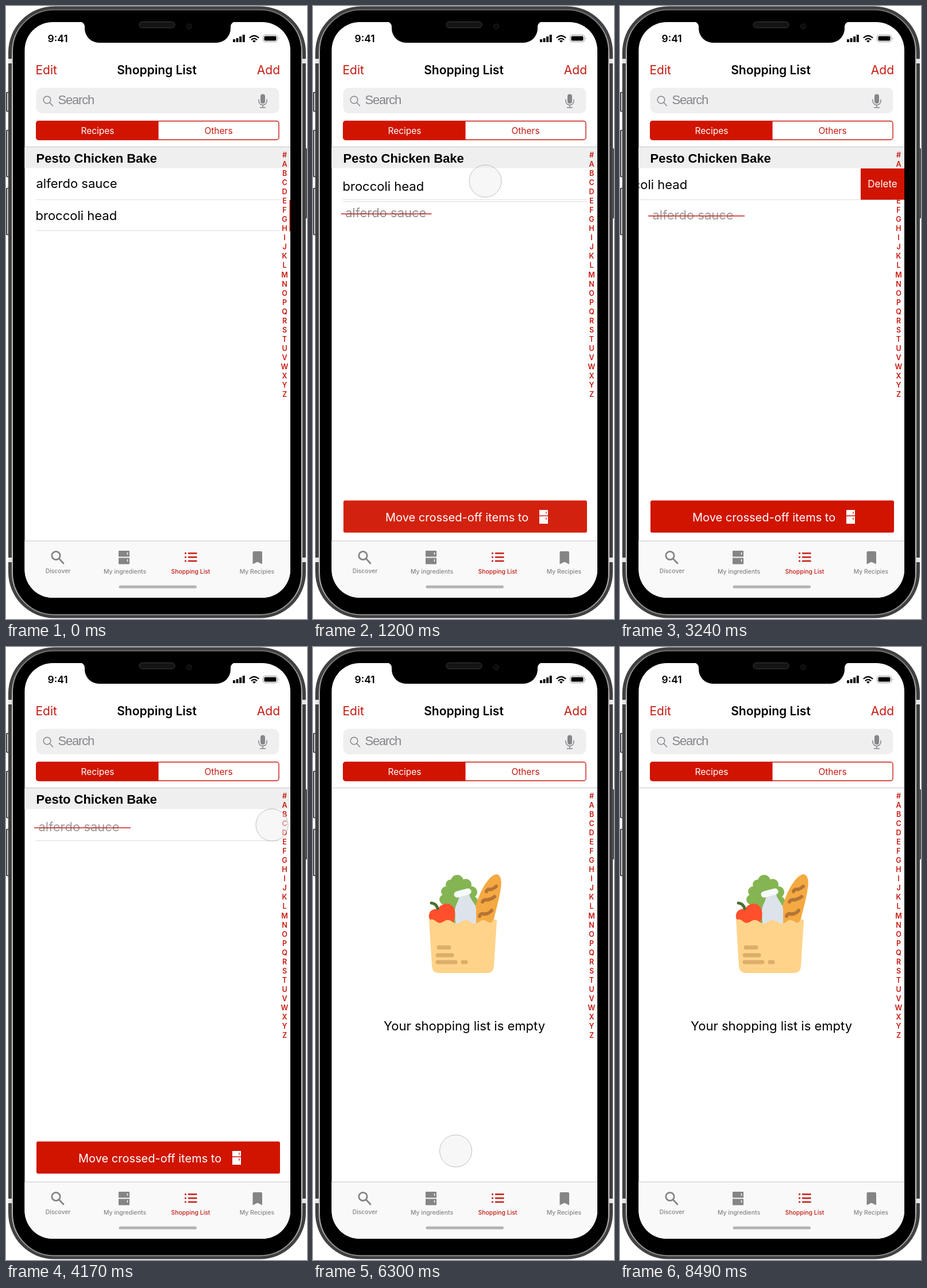
Recreate the animation shown at these times as an HTML page. Size 524 px wide and 1068 px high, loop 8520 ms.

```html
<!DOCTYPE html>
<html lang="en">
<head>
<meta charset="utf-8">
<title>Shopping List</title>
<style>
  html, body { margin: 0; width: 100%; height: 100%; overflow: hidden; background: #fff; }
  svg { display: block; width: 524px; height: 1068px; font-family: Inter, sans-serif; }
  .red { fill: #c51a10; }
  .row { font-size: 22px; }
  .tab { font-size: 10.4px; font-weight: 500; fill: #858585; text-anchor: middle; }
  .mid { text-anchor: middle; }
  .line { fill: none; stroke-linecap: round; stroke-linejoin: round; }
</style>
</head>
<body>
<svg viewBox="0 0 524 1068">
  <defs>
    <clipPath id="screen"><rect x="32.5" y="28" width="462.5" height="1003" rx="49"/></clipPath>
    <linearGradient id="sheen" x2="0" y2="1">
      <stop offset="0" stop-color="#6f6f72"/><stop offset=".1" stop-color="#c9c9cb"/>
      <stop offset=".9" stop-color="#c9c9cb"/><stop offset="1" stop-color="#8f8f92"/>
    </linearGradient>
    <g id="fridge">
      <path d="M0 1q0-1 1-1h17q1 0 1 1v9.500h-19zM0 12.500h19v10q0 1-1 1h-17q-1 0-1-1z"/>
      <path d="M15.500 3v4M15.500 15v4" stroke="#f9f9f9" stroke-width="1.500"/>
    </g>
  </defs>

  <!-- Phone body -->
  <g fill="#c4c4c6" stroke="#2c2c2e" stroke-width="1.500">
    <rect x=".8" y="150.500" width="5" height="33" rx="1.500"/>
    <rect x=".8" y="216.500" width="5" height="81" rx="1.500"/>
    <rect x=".8" y="317.500" width="5" height="81" rx="1.500"/>
    <rect x="518" y="248.500" width="5.200" height="121" rx="1.500"/>
  </g>
  <rect x="4" y=".5" width="518" height="1066" rx="80" fill="#414143"/>
  <path d="M4 92h7v8h-7zM4 961h7v8h-7zM515 92h7v8h-7zM515 961h7v8h-7z" fill="#e4e4e5"/>
  <rect x="11" y="6.500" width="504" height="1054" rx="73" stroke="url(#sheen)" stroke-width="2"/>

  <g clip-path="url(#screen)">
    <rect x="32" y="28" width="464" height="1003" fill="#fff"/>

    <g id="list">
      <rect x="32" y="246" width="464" height="36.500" fill="#efefef"/>
      <text x="52.500" y="273" font-family="Liberation Sans, sans-serif" font-size="22" font-weight="700">Pesto Chicken Bake</text>
      <path d="M52 337.500H476" stroke="#dcdcdc"/>
      <g id="broccoli">
        <text class="row" x="51.500" y="373">broccoli head</text>
        <path d="M52 391.500H476" stroke="#dcdcdc"/>
      </g>
      <g id="sauce">
        <text id="sauceText" class="row" y="316.500">alferdo sauce</text>
        <path id="strike" stroke="#c62218" stroke-width="1.500"/>
      </g>
      <g id="move">
        <rect x="53" y="861.500" width="424" height="56" rx="3" fill="#d01400"/>
        <text x="126" y="897.500" font-size="20" fill="#fff">Move crossed-off items to</text>
        <path d="M394 878h15v9.500h-15zM394 889h15v13h-15z" fill="#fff"/>
        <path d="M406 881v3.500M406 891v4" stroke="#d01400" stroke-width="1.300"/>
      </g>
    </g>

    <g id="empty">
      <g fill="#84b552">
        <circle cx="252" cy="436" r="26"/><circle cx="251" cy="408" r="11"/>
        <circle cx="240" cy="414" r="9"/><circle cx="266" cy="414" r="10"/>
        <circle cx="232" cy="426" r="9"/><circle cx="276" cy="427" r="10"/>
        <circle cx="229" cy="440" r="9"/><circle cx="278" cy="443" r="9"/>
        <path d="M222 440L284 440 276 482H240z"/>
      </g>
      <path d="M290 432C299 411 311 396 320 396C327 397 329 408 327 419C325 437 318 459 313 482H278C280 462 283 447 290 432Z" fill="#f5a942"/>
      <path class="line" d="M302 426c2-6 6-3 9-4s5-2 8-5M295 444c3-6 7-2 11-4s6-1 10-5M290 469c2-7 7-3 11-4s6-1 10-6" stroke="#b47435" stroke-width="6"/>
      <path d="M254 434L272 431C274 441 283 446 284 457V482H248L247 459C248 447 254 444 254 434Z" fill="#dce3eb"/>
      <path class="line" d="M251 431L270 426" stroke="#f7fafc" stroke-width="11"/>
      <path d="M202 472C200 460 210 455 217 457C223 446 238 444 244 453C250 461 247 474 243 483H207Z" fill="#ff4f2d"/>
      <path class="line" d="M206 446q9 1 11 10" stroke="#49702f" stroke-width="5"/>
      <path d="M202 475q8-2 12 3q6 5 12 1q9-7 17 0q7 6 14 0q9-7 17 0q7 6 15 0q7-6 14-1q7 5 10-1q4-3 7-2L315 556Q314 568 303 568H219Q208 568 207 556Z" fill="#ffd38a"/>
      <path class="line" d="M219 523.500H237M217 537H242M217 549H248M261 549H266" stroke="#dcae6a" stroke-width="7"/>
      <text class="mid" x="263.500" y="668" font-size="22">Your shopping list is empty</text>
    </g>

    <!-- Header -->
    <text x="72.500" y="63" font-size="17.500" font-weight="600">9:41</text>
    <path d="M395 58h4v5h-4zM400.600 56h4v7h-4zM406.200 53h4v10h-4zM411.800 50h4v13h-4z"/>
    <path class="line" d="M424.500 55q7.500-6.500 15 0M427.500 58.500q4.500-3.800 9 0" stroke="#000" stroke-width="2.200"/>
    <path d="M429 60.800q3-2.200 6 0l-3 3z"/>
    <rect x="447.500" y="50.500" width="25" height="12" rx="3.500" fill="none" stroke="#999"/>
    <rect x="449.500" y="52.500" width="21" height="8" rx="1.800"/>
    <path d="M474.500 54.500q2 2 0 4z" fill="#999"/>
    <g font-size="21">
      <text class="red" x="51.500" y="118.500">Edit</text>
      <text class="mid" x="262.500" y="118.500" font-weight="600">Shopping List</text>
      <text class="red" x="477" y="118.500" text-anchor="end">Add</text>
    </g>
    <rect x="52.500" y="142.500" width="423" height="44.500" rx="10" fill="#efeff0"/>
    <g class="line" stroke="#85858a" stroke-width="1.500">
      <circle cx="71.500" cy="163.500" r="6.300"/><path d="M76 168l5.500 6"/>
      <path d="M440 163v2.500a7 7 0 0 0 14 0v-2.500M447 172.500v4.500M442.500 177h9"/>
    </g>
    <rect x="443" y="153.500" width="8" height="16.500" rx="4" fill="#85858a"/>
    <text x="90.500" y="171" font-family="Liberation Sans, sans-serif" font-size="22" letter-spacing="-1.200" fill="#85858a">Search</text>
    <rect x="52.700" y="200.500" width="422.300" height="32.500" rx="4" fill="#fff" stroke="#c51a10" stroke-width="1.400"/>
    <path d="M265.500 200H57q-4.500 0-4.500 4.500V229q0 4.500 4.500 4.500H265.500z" fill="#d01400"/>
    <g class="mid" font-size="15.500">
      <text x="159.500" y="222.700" fill="#fff">Recipes</text>
      <text class="red" x="370" y="222.700">Others</text>
    </g>
    <path d="M32 245.500H496" stroke="#c4c4c6"/>
    <g id="index" class="red mid" font-size="12.500" font-weight="600"></g>

    <g id="delete">
      <rect y="338" width="76" height="54.500" fill="#d01400"/>
      <text class="mid" x="38" y="371" font-size="17" fill="#fff">Delete</text>
    </g>

    <!-- Tab bar -->
    <rect x="32" y="932" width="464" height="100" fill="#f9f9f9"/>
    <path d="M32 932H496" stroke="#c4c4c6"/>
    <g class="line" stroke="#858585" stroke-width="2.800">
      <circle cx="87" cy="957.500" r="7.200"/><path d="M92.500 963l7.500 8"/>
    </g>
    <use href="#fridge" x="196" y="949" fill="#858585"/>
    <path d="M317 953.500H332.500M317 960.200H332.500M317 967H332.500M311 953.500h3M311 960.200h3M311 967h3" stroke="#c51a10" stroke-width="2.400"/>
    <path d="M429.500 952q0-2 2-2h12.500q2 0 2 2v20.500l-8.250-4-8.250 4z" fill="#858585"/>
    <text class="tab" x="90.500" y="988">Discover</text>
    <text class="tab" x="207" y="989">My ingredients</text>
    <text class="tab" x="321.500" y="989" style="fill:#c51a10">Shopping List</text>
    <text class="tab" x="437" y="989">My Recipies</text>
    <rect x="196.500" y="1009.500" width="135.500" height="5" rx="2.500" fill="#b4b4b6"/>
  </g>

  <!-- Notch -->
  <path d="M128 27a9 9 0 0 1 9 9v3a25 25 0 0 0 25 25H366a25 25 0 0 0 25-25v-3a9 9 0 0 1 9-9z"/>
  <rect x="232" y="27.500" width="62" height="10.500" rx="5.200" fill="#141414" stroke="#3c3c3c"/>
  <circle cx="319" cy="35.500" r="4.500" fill="#0b0b0d" stroke="#222226"/>

  <circle id="touch"/>
</svg>
<script>
const LOOP = 8520, CROSS = 1020, SWIPE = 2640, REMOVE = 3990, MOVE = 6120;
const $ = id => document.getElementById(id);
const clamp = v => Math.max(0, Math.min(1, v));
const mix = (a, b, p) => a + (b - a) * p;
const easeOut = (t, start, span = 300) => 1 - (1 - clamp((t - start) / span)) ** 3;
const show = (id, on) => $(id).style.display = on ? '' : 'none';
const shift = (id, x, y) => $(id).setAttribute('transform', `translate(${x} ${y})`);

$('index').innerHTML = [...'#ABCDEFGHIJKLMNOPQRSTUVWXYZ']
  .map((c, i) => `<text x="485" y="${264 + i * 16.04}">${c}</text>`).join('');

const touches = [
  { down: 740, up: CROSS, from: 150, to: 300, y: 305 },
  { down: 2250, up: 2700, from: 392, to: 310, y: 292.500 },
  { down: 3810, up: REMOVE, from: 463, to: 463, y: 310 },
  { down: 5870, up: MOVE, from: 248.500, to: 248.500, y: 878 }
];

function drawTouch(t) {
  const touch = touches.find(k => t >= k.down && t < k.up + 360);
  show('touch', touch);
  if (!touch) return;
  const { down, up, from, to, y } = touch;
  const drag = clamp((t - down - 140) / (up - down - 140));
  const appear = clamp((t - down) / 120);
  const release = clamp((t - up) / 180);
  const pressure = appear * (1 - release);
  const grey = mix(240, 183, pressure);
  const attrs = {
    cx: mix(from, to, drag * drag * (3 - 2 * drag)), cy: y, r: mix(27, 28, release),
    fill: `rgba(${grey},${grey},${grey},${mix(.5, .35, pressure)})`,
    stroke: 'rgba(175,175,175,.8)',
    opacity: appear * (1 - clamp((t - up - 180) / 180))
  };
  for (const name in attrs) $('touch').setAttribute(name, attrs[name]);
}

function draw(t) {
  const cross = easeOut(t, CROSS), swipe = easeOut(t, SWIPE), remove = easeOut(t, REMOVE);
  show('list', t < MOVE);
  show('empty', t >= MOVE);
  show('broccoli', t < REMOVE);
  show('delete', t < CROSS || (t >= SWIPE && t < REMOVE));

  shift('broccoli', -76 * swipe, -54 * cross);
  shift('delete', t < CROSS ? 493.500 : 495 - 76 * swipe, t < CROSS ? 0 : -55);
  shift('sauce', 0, 55 * cross - 54 * remove);

  const shade = mix(0, 155, cross);
  $('sauceText').setAttribute('x', mix(52.500, 56.500, cross));
  $('sauceText').setAttribute('fill', `rgb(${shade},${shade},${shade})`);
  $('strike').setAttribute('d', `M49 310.700h${168 * cross}`);
  show('strike', cross > 0);
  $('move').setAttribute('opacity', cross);
  drawTouch(t);
}

const begin = performance.now();
(function tick() {
  draw((performance.now() - begin) % LOOP);
  requestAnimationFrame(tick);
})();
</script>
</body>
</html>
```
